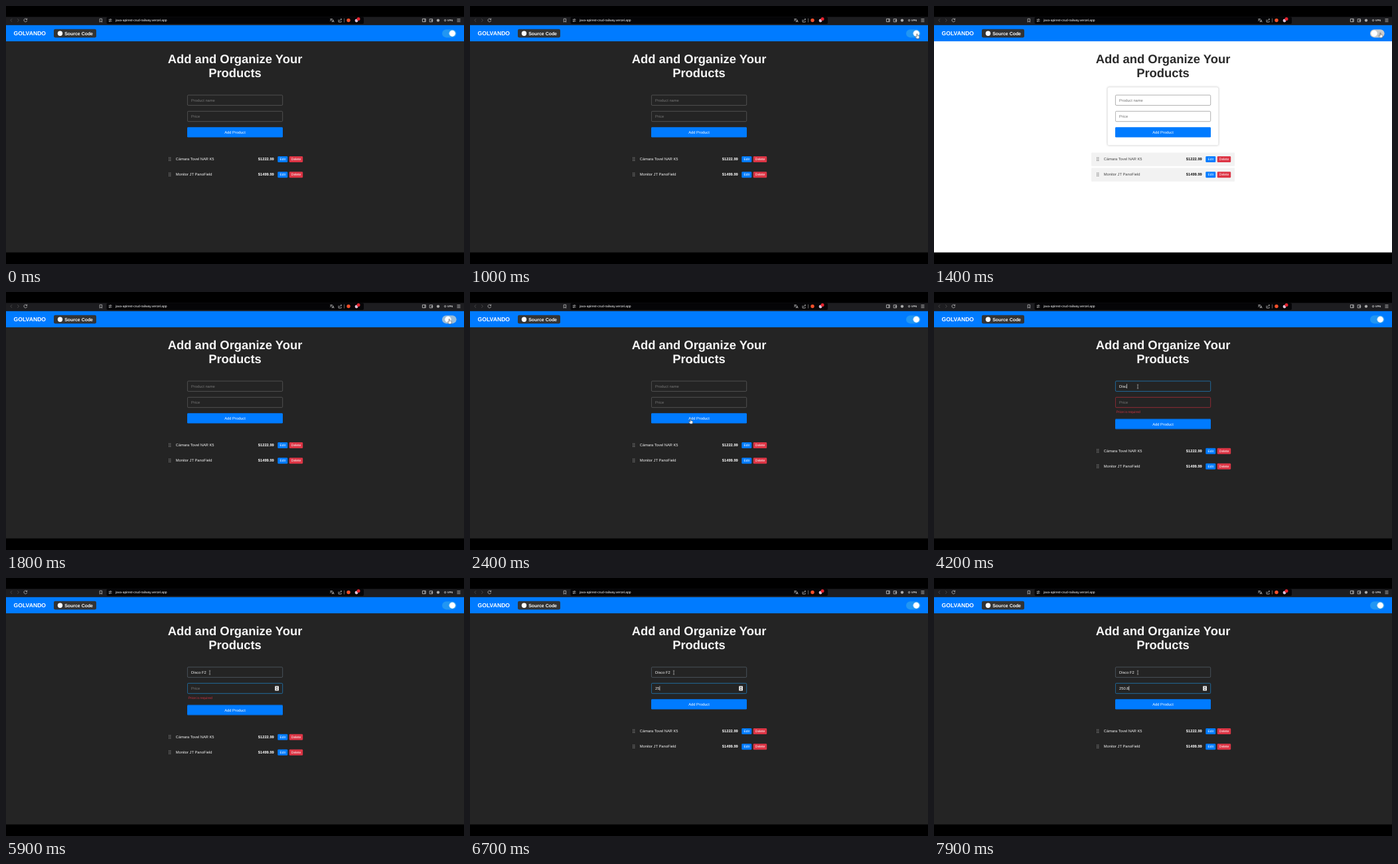
These frames come from a looping animation (690 by 388 pixels, 8 s). An HTML page:

```html
<!DOCTYPE html>
<html lang="en">
<head>
<meta charset="utf-8">
<title>Product list</title>
<style>
html, body { margin: 0; width: 100%; height: 100%; overflow: hidden; background: #000; }
svg {
  display: block; width: 100vw; height: 100vh;
  font: 5.75px "Liberation Sans", Arial, sans-serif;
  text-rendering: geometricPrecision;
  --bg: #242424; --title: #f6f6f6; --fg: #f2f2f2; --price: #fff; --grip: #aaa; --line: #646464; --card: 0;
  animation: theme 8s step-end infinite;
}
.mid { text-anchor: middle; }
.bold { font-weight: bold; }
.title { font-size: 18.4px; fill: var(--title); }
.brand { font-size: 8.625px; fill: #fff; }
.small { font-size: 5px; fill: #fff; }
.error { font-size: 5.03px; fill: #cc3241; opacity: 0; }
.hint { fill: #757575; }
.value { fill: #f4f4f4; white-space: pre; }
.card { opacity: var(--card); }
.input { fill: var(--bg); stroke-width: .7; }
.icon { fill: none; stroke: #bbb; stroke-width: .8; }
.blue { fill: #007bff; }
.red { fill: #dc3545; }

.track { animation: track 8s infinite; }
.knob { fill: #fff; animation: knob 8s infinite; }
.name-box { animation: name-box 8s linear infinite; }
.price-box { animation: price-box 8s linear infinite; }
.name-error { animation: name-error 8s step-end infinite; }
.price-error { animation: price-error 8s step-end infinite; }
.after-name { animation: after-name 8s step-end infinite; }
.after-price { animation: after-price 8s step-end infinite; }
.ring { fill: none; stroke: #bccbdd; stroke-width: .7; opacity: 0; animation: ring 8s step-end infinite; }
.spinner { opacity: 0; animation: spinner 8s step-end infinite; }
.pointer { animation: pointer 8s ease-in-out infinite; }
.pointer path { stroke-linejoin: round; opacity: 0; }
.hand { animation: hand 8s step-end infinite; }
.arrow { animation: arrow 8s step-end infinite; }
.beam { animation: beam 8s step-end infinite; }

@keyframes theme {
  13.375% { --bg: #fff; --title: #2a2a2a; --fg: #484848; --price: #151515; --grip: #444; --line: #8e8e8e; --card: 1; }
  22.125%, 100% { --bg: #242424; --title: #f6f6f6; --fg: #f2f2f2; --price: #fff; --grip: #aaa; --line: #646464; --card: 0; }
}
@keyframes track {
  0%, 13%, 26.5%, 100% { fill: #2196f3; }
  18%, 21.5% { fill: #ccc; }
}
@keyframes knob {
  0%, 13%, 26.5%, 100% { transform: translateX(9.3px); }
  18%, 21.5% { transform: none; }
}
@keyframes name-box {
  0%, 32.12% { stroke: var(--line); }
  32.125%, 40.875% { stroke: #bf303e; }
  42.5%, 67.125% { stroke: #2189cf; }
  68.75%, 100% { stroke: #596672; }
}
@keyframes price-box {
  0%, 32.12% { stroke: var(--line); }
  32.125%, 67.125% { stroke: #bf303e; }
  68.75%, 100% { stroke: #2189cf; }
}
@keyframes name-error { 32.125% { opacity: 1; } 52.125%, 100% { opacity: 0; } }
@keyframes price-error { 32.125% { opacity: 1; } 78.375%, 100% { opacity: 0; } }
@keyframes after-name { 32.125% { transform: translateY(8.65px); } 52.125%, 100% { transform: none; } }
@keyframes after-price { 32.125% { transform: translateY(8.65px); } 78.375%, 100% { transform: none; } }
@keyframes ring { 32.125% { opacity: 1; } 40.875%, 100% { opacity: 0; } }
@keyframes spinner { 67.125%, 100% { opacity: 1; } }
@keyframes pointer {
  0%, 10.875% { transform: translate(687px, 62px); }
  12.875%, 21.25% { transform: translate(672.5px, 40.5px); }
  22.5% { transform: translate(667.8px, 40.8px); }
  30.5%, 33.75% { transform: translate(329.7px, 192px); }
  39.375%, 100% { transform: translate(307px, 142.2px); }
}
@keyframes hand { 12% { opacity: 1; } 24.5% { opacity: 0; } 30% { opacity: 1; } 32.125%, 100% { opacity: 0; } }
@keyframes arrow { 10.875% { opacity: 1; } 12% { opacity: 0; } 24.5% { opacity: 1; } 30% { opacity: 0; } 32.125% { opacity: 1; } 38.5%, 100% { opacity: 0; } }
@keyframes beam { 38.5%, 100% { opacity: 1; } }
</style>
</head>
<body>
<svg viewBox="0 0 690 388" preserveAspectRatio="none">
  <defs>
    <filter id="glow" x="-10%" y="-10%" width="120%" height="120%"><feGaussianBlur stdDeviation="1.6"/></filter>
    <g id="row">
      <rect class="card" x="237" y="220.5" width="216" height="20.3" rx="1" fill="#f2f2f2"/>
      <path d="M245.7 227.6v5.6M247.8 227.6v5.6" stroke="var(--grip)" stroke-width="1" stroke-dasharray="1 1.2"/>
      <rect class="blue" x="409.3" y="226.1" width="15" height="9" rx="1.3"/>
      <rect class="red" x="426.7" y="226.1" width="20.5" height="9" rx="1.3"/>
      <text class="small mid" x="416.8" y="232.4">Edit</text>
      <text class="small mid" x="437" y="232.4">Delete</text>
    </g>
  </defs>

  <rect width="690" height="388"/>
  <rect y="16.4" width="690" height="12.6" fill="#1d1d20"/>
  <rect x="151.5" y="16.4" width="387.5" height="10.6" rx="2" fill="#050507"/>
  <g class="icon">
    <path d="M9 19.3l-2.2 2.2 2.2 2.2M17.3 19.3l2.2 2.2-2.2 2.2" stroke="#555"/>
    <path d="M31.3 20a2.4 2.4 0 1 0 .4 2M31.7 18.6v1.9h-1.9"/>
    <path d="M141.2 19.2h3.4v5l-1.7-1.3-1.7 1.3z"/>
    <path d="M154.6 20.3h2M158.5 20.3h1M154.6 22.8h1M157.5 22.8h2"/>
    <circle cx="157.5" cy="20.3" r=".8"/><circle cx="156.4" cy="22.8" r=".8"/>
    <path d="M488.2 19.7h4M490.2 19v.7c0 1.3-1 2.3-2 2.9M489 20.7l2 2M491.2 24.3l1.5-3.6 1.5 3.6M491.8 23.2h1.9"/>
    <path d="M501 20.5v3.6h4.2v-1.5M502.6 22.4c.2-1.7 1.3-2.4 3-2.4M504.4 18.8l1.4 1.2-1.4 1.2"/>
    <path d="M509.5 18.6v6" stroke="#777"/>
    <path d="M627.4 19.3h4.8v4.4h-4.8zM631 19.3v4.4" stroke-width=".9"/>
    <path d="M638.2 19.5h4.3v4.4h-4.3zM640.8 21.1h2v1.4h-2z"/>
    <path d="M679.5 19.6h5M679.5 21.6h5M679.5 23.6h5"/>
    <circle cx="661.6" cy="21.6" r="1.2" stroke-width="1"/>
  </g>
  <circle cx="651" cy="21.6" r="2.2" fill="#aaa"/>
  <circle cx="516" cy="21.5" r="2.7" fill="#f4502a"/>
  <circle cx="528" cy="22" r="2.4" fill="#d8bfd6"/>
  <circle cx="531" cy="19.5" r="2.5" fill="#e5232e"/>
  <text x="165" y="23.3" font-size="4.95" fill="#fff">java-apirest-crud-railway.vercel.app</text>
  <text class="bold" x="664.8" y="23.1" font-size="4.1" fill="#ddd">VPN</text>

  <rect y="53" width="690" height="317.6" fill="var(--bg)"/>
  <rect class="blue" y="28.8" width="690" height="24.3"/>
  <text class="brand bold" x="11.6" y="44.3">GOLVANDO</text>
  <rect x="72" y="34.8" width="64" height="12.6" rx="2.2" fill="#333"/>
  <circle cx="81.5" cy="41.2" r="3.7" fill="#fff"/>
  <text class="bold" x="88.2" y="43.6" font-size="6.95" fill="#fff">Source Code</text>
  <rect class="track" x="657" y="35.2" width="21.6" height="12.2" rx="6.1"/>
  <circle class="knob" cx="663.1" cy="41.3" r="4.7"/>

  <text class="title bold mid" x="345" y="86.1">Add and Organize Your</text>
  <text class="title bold mid" x="345" y="106.5">Products</text>

  <g class="card">
    <rect x="261" y="121.8" width="168" height="88" rx="3" fill="#000" opacity=".2" filter="url(#glow)"/>
    <rect x="261.6" y="122.3" width="166.8" height="87" rx="2.9" fill="#fff"/>
  </g>

  <rect class="input name-box" x="273.4" y="134" width="143.3" height="15.4" rx="1.4"/>
  <text class="hint" id="name-hint" x="279" y="143.5">Product name</text>
  <text class="value" id="name" x="279" y="143.5"></text>
  <text class="error name-error" x="274.7" y="157.1">Name must be at least 4 characters</text>

  <g class="after-name">
    <rect class="input price-box" x="273.4" y="158.3" width="143.3" height="15.4" rx="1.4"/>
    <text class="hint" id="price-hint" x="279" y="167.9">Price</text>
    <text class="value" id="price" x="279" y="167.9"></text>
    <g class="spinner">
      <rect x="405.2" y="162.5" width="5.8" height="7" rx=".6" fill="#eee"/>
      <path d="M406.7 165.2l1.4-1.6 1.4 1.6zM406.7 166.8l1.4 1.6 1.4-1.6z" fill="#333"/>
    </g>
    <text class="error price-error" x="274.5" y="181.8">Price is required</text>

    <g class="after-price">
      <rect class="blue" x="273" y="182.3" width="144" height="15.3" rx="1.4"/>
      <rect class="ring" x="272.6" y="181.9" width="144.8" height="16.1" rx="1.7"/>
      <text class="mid" x="345" y="191.9" fill="#fff">Add Product</text>
      <g>
        <use href="#row"/>
        <text x="255.8" y="232.4" fill="var(--fg)">Cámara Tovel NAR K5</text>
        <text class="bold" x="379.8" y="232.4" fill="var(--price)">$1222.99</text>
      </g>
      <g transform="translate(0 23.1)">
        <use href="#row"/>
        <text x="255.8" y="232.4" fill="var(--fg)">Monitor JT PanoField</text>
        <text class="bold" x="379.8" y="232.4" fill="var(--price)">$1499.99</text>
      </g>
    </g>
  </g>

  <rect id="caret" width=".6" height="6.8" fill="#fff"/>

  <g class="pointer">
    <path class="hand" d="M-.6 0q.6-.6 1.2 0v2.5l2.3.6q.8.3.7 1.2l-.6 2.9h-3.6l-2.2-3q.3-.9 1.3-.3l.9.7z" fill="#fff" stroke="#222" stroke-width=".5"/>
    <path class="arrow" d="M0 0v5.1l1.2-1.1.8 1.9.9-.4-.8-1.8h1.6z" fill="#fff" stroke="#111" stroke-width=".4"/>
    <path class="beam" d="M-1.2-2.8h.8q.4 0 .4.4v4.8q0 .4-.4.4h-.8M1.2-2.8h-.8q-.4 0-.4.4M1.2 2.8h-.8q-.4 0-.4-.4" fill="none" stroke="#d5d5d5" stroke-width=".6"/>
  </g>
</svg>
<script>
const LOOP = 8000, BLINK = 500;
// [time in ms, focused field, its value]
const edits = [
  [3270, 'name', ''], [3770, 'name', 'D'], [3970, 'name', 'Di'], [4070, 'name', 'Dis'],
  [4170, 'name', 'Disc'], [4270, 'name', 'Disco'], [4470, 'name', 'Disco '],
  [4870, 'name', 'Disco F'], [5170, 'name', 'Disco F2'],
  [5370, 'price', ''], [6270, 'price', '2'], [6670, 'price', '25'], [6970, 'price', '250'],
  [7470, 'price', '250.'], [7770, 'price', '250.8']
];
const byId = id => document.getElementById(id);
const caret = byId('caret');

function setField(id, value) {
  const field = byId(id);
  if (field.textContent !== value) field.textContent = value;
  byId(id + '-hint').style.visibility = value ? 'hidden' : 'visible';
}

function draw(now) {
  const t = now % LOOP;
  const values = { name: '', price: '' };
  let last = null;
  for (const edit of edits) {
    if (edit[0] > t) break;
    last = edit;
    values[edit[1]] = edit[2];
  }
  setField('name', values.name);
  setField('price', values.price);

  const shown = last && (t - last[0]) % (2 * BLINK) < BLINK;
  caret.style.visibility = shown ? 'visible' : 'hidden';
  if (shown) {
    const field = byId(last[1]);
    const width = last[2] ? field.getComputedTextLength() : 0;
    caret.setAttribute('x', 279 + width + .2);
    caret.setAttribute('y', last[1] === 'name' ? 138.2 : 162.5);
  }
  requestAnimationFrame(draw);
}
requestAnimationFrame(draw);
</script>
</body>
</html>
```
